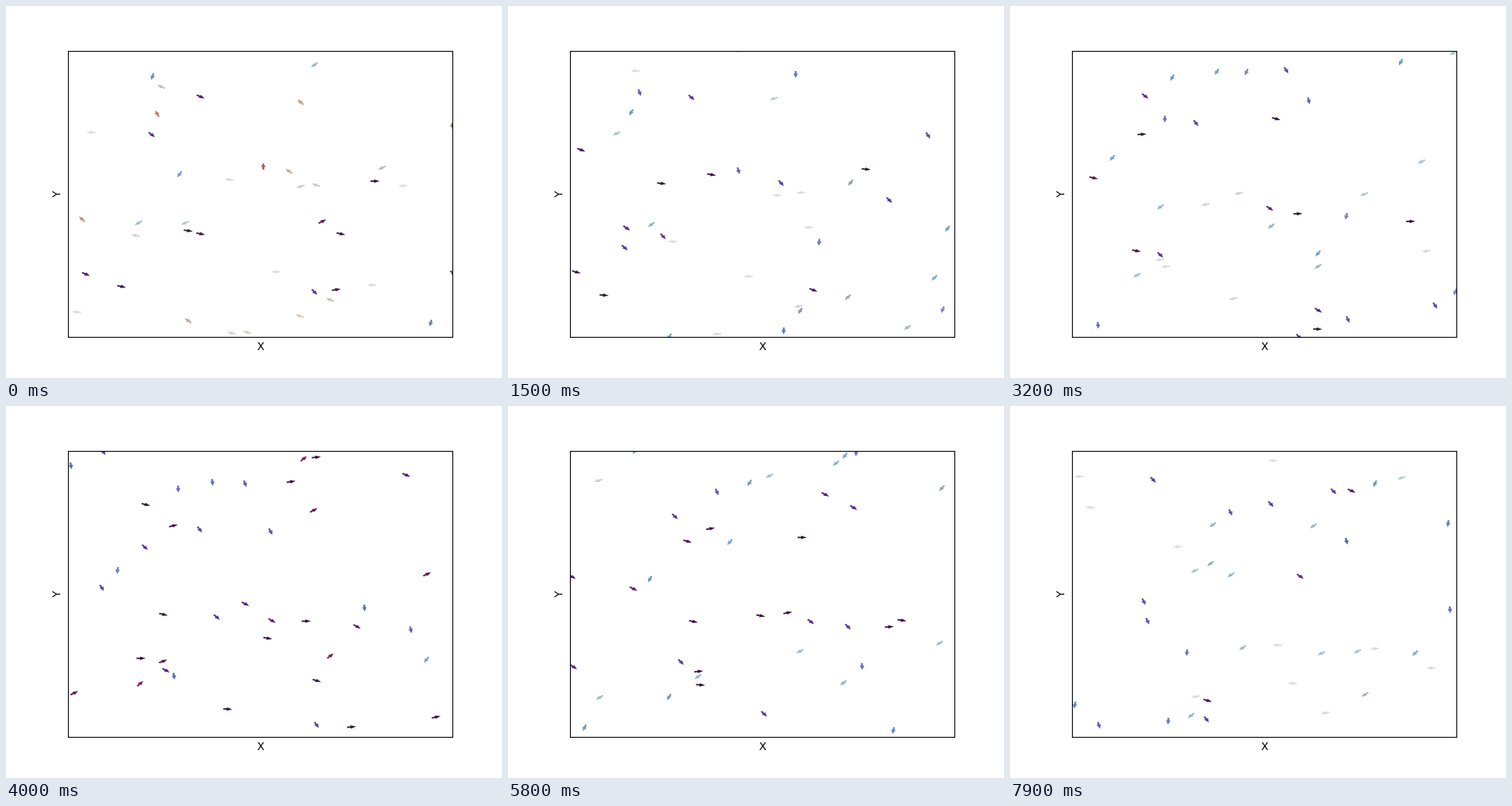
Animation of 640x480 px, one loop 8000 ms. Source, as a matplotlib script:

```python
import numpy as np
import matplotlib.pyplot as plt
from matplotlib.animation import FuncAnimation
from matplotlib.collections import PolyCollection

FRAMES, INTERVAL = 80, 100
LEFT, TOP, WIDTH, HEIGHT = 80, 57.6, 496, 369.6
STRETCH = WIDTH / HEIGHT
SPEED = 3
rng = np.random.default_rng(12)

# x, y, heading in degrees at the start
birds = np.array([
    (189, 91, -105), (200, 104, 148), (251, 117, -30), (398, 76, -135),
    (380, 124, 130), (195, 139, 112), (188, 166, -48), (110, 163, 174),
    (576, 155, 100), (332, 207, 91), (365, 213, 138), (224, 217, -118),
    (288, 224, 172), (380, 233, -155), (400, 231, 158), (485, 209, -145),
    (476, 226, 0), (512, 232, -176), (98, 275, 127), (171, 280, -140),
    (167, 296, 163), (231, 280, -150), (235, 290, -12), (251, 294, -16),
    (408, 278, 35), (432, 294, -17), (103, 346, -30), (149, 362, -17),
    (348, 343, 180), (577, 345, -50), (398, 369, -55), (426, 366, 12),
    (418, 379, 150), (472, 360, 174), (91, 395, 174), (235, 406, 135),
    (379, 400, 158), (291, 422, 163), (311, 421, 160), (548, 409, -100),
])

# Common heading of the flock, drifting through a few turning points
steps = np.arange(FRAMES)
flock = np.interp(steps, [0, 15, 34, 40, 51, 57, 66, 79],
                  [2.2, 4.6, 4.8, 5.7, 6.7, 5.1, 4.65, 4.55])


def fly():
    """Each step: follow the flock with strong noise, wrap at the walls."""
    pos, heading = birds[:, :2].astype(float), np.radians(birds[:, 2])
    track = [(pos, heading)]
    for mean in flock[1:]:
        heading = mean + rng.uniform(-np.pi / 2, np.pi / 2, len(birds))
        move = SPEED * np.column_stack([STRETCH * np.cos(heading),
                                        -np.sin(heading)])
        pos = (pos + move - (LEFT, TOP)) % (WIDTH, HEIGHT) + (LEFT, TOP)
        track.append((pos, heading))
    return track


ARROW = np.array([(-4.2, -.9), (-.8, -.9), (-.8, -2.2), (4.6, 0),
                  (-.8, 2.2), (-.8, .9), (-4.2, .9)])


def arrows(pos, heading):
    c, s = np.cos(heading)[:, None], np.sin(heading)[:, None]
    along, across = ARROW.T
    x = STRETCH * (along * c - across * s)
    y = -(along * s + across * c)
    return np.stack([x, y], axis=2) + pos[:, None]


def wrap_angle(a):
    return (a + np.pi) % (2 * np.pi) - np.pi


track = fly()
fig, ax = plt.subplots(figsize=(6.4, 4.8), dpi=100)
ax.set(xlim=(LEFT, LEFT + WIDTH), ylim=(TOP + HEIGHT, TOP),
       xticks=[], yticks=[], xlabel="X", ylabel="Y")
flight = PolyCollection([], cmap="twilight", linewidths=0)
flight.set_clim(-np.pi, np.pi)
ax.add_collection(flight, autolim=False)


def draw(i):
    pos, heading = track[i]
    flight.set_verts(arrows(pos, heading))
    flight.set_array(wrap_angle(heading))
    return flight,


anim = FuncAnimation(fig, draw, frames=FRAMES, interval=INTERVAL,
                     init_func=lambda: draw(0), repeat=True, repeat_delay=0)
plt.show()
```
